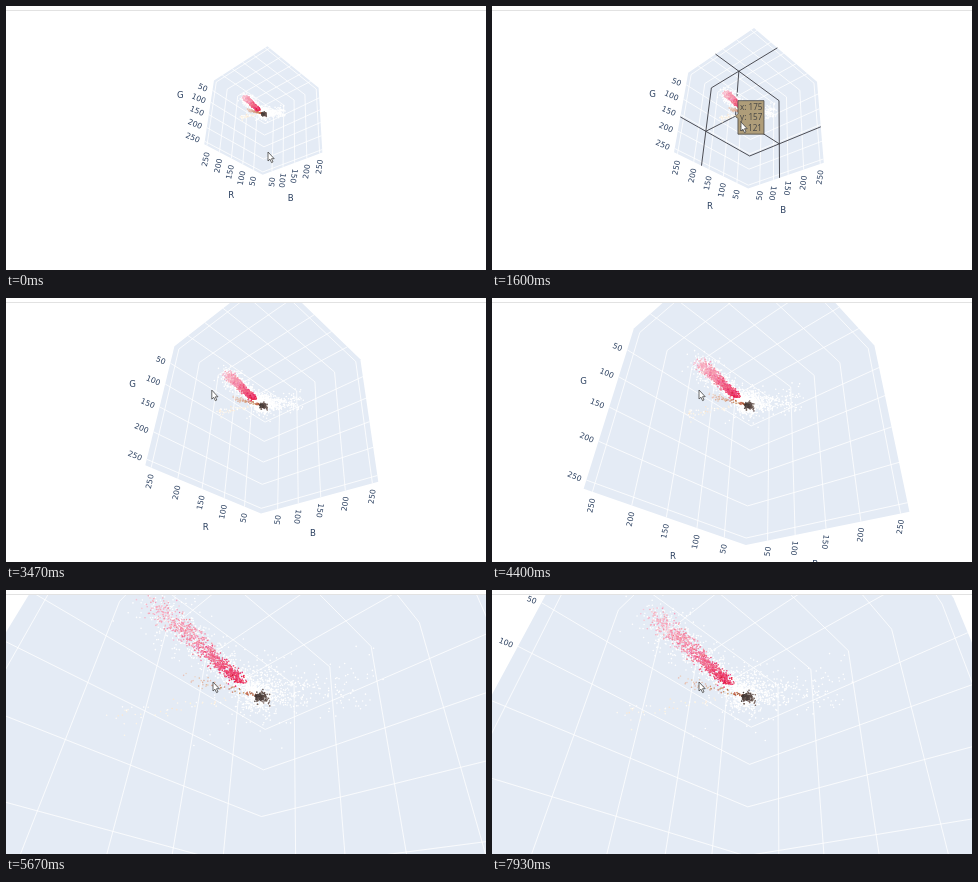
These frames come from a looping animation (480 px wide and 264 px high, 8000 ms). An HTML page with a canvas:

```html
<!DOCTYPE html>
<html lang="en">
<head>
<meta charset="utf-8">
<title>Colour cube</title>
<style>
  html, body { margin: 0; width: 480px; height: 264px; overflow: hidden; background: #fff; }
  canvas { position: absolute; left: 0; top: 0; }
  svg { position: absolute; left: 0; top: 5px; }
  text { font-family: "DejaVu Sans", Verdana, sans-serif; font-size: 7.7px; fill: #2a3f5f; }
  .title { font-size: 8.6px; text-anchor: middle; }
  #tip text { font-family: "Open Sans", sans-serif; font-size: 8.1px; fill: #444; }
</style>
</head>
<body>
<canvas id="plot" width="480" height="264"></canvas>
<svg width="480" height="259" viewBox="0 5 480 259">
  <g id="labels"></g>
  <g id="tip">
    <path d="M0 0l2.5 -2.5V-15.5H28.5V18H2.5V2.5Z" fill="rgb(175,157,121)" stroke="#444" stroke-width=".8"/>
    <text x="4.6" y="-6.4">x: 175</text>
    <text x="4.6" y="4.1">y: 157</text>
    <text x="4.6" y="14.6">z: 121</text>
  </g>
  <path id="cursor" d="M0 0V9L2 7.2L3.5 10.6L5 9.9L3.5 6.7H6.2Z" fill="#fff" stroke="#444" stroke-width=".8" stroke-linejoin="round"/>
</svg>
<script>
const LOOP = 8000, STEP = 200 / 3;
const CX = 258.9, CY = 108.3, FOCAL = 373, TILT = 0.577;
// Screen direction of each cube edge
const AXES = [[-0.7, -0.46], [-0.038, 0.82], [0.722, -0.36]];
const TICKS = [50, 100, 150, 200, 250];
const unit = v => (v - 6.3) / 254;
const HOVER = [175, 157, 121].map(unit);

// Each move: begin, end, value reached
const ZOOM = [[70, 870, 5.55], [1200, 2330, 2.565], [3930, 4830, 1.66], [5200, 6000, 0.745], [7200, 7930, 1.055]];
const POINTER = [[70, 600, [249, 116]], [2660, 2930, [135, 99]], [3270, 3470, [207, 92]]];

const lerp = (a, b, k) => a + (b - a) * k;
const progress = (t, begin, end) => Math.min(1, Math.max(0, (t - begin) / (end - begin)));
const easeOut = k => 1 - (1 - k) ** 1.5;

// Scrolling multiplies the distance, so it eases in log space
const distanceAt = t => Math.exp(ZOOM.reduce(
  (d, [begin, end, to]) => lerp(d, Math.log(to), easeOut(progress(t, begin, end))), Math.log(4.78)));
const pointerAt = t => POINTER.reduce(
  (p, [begin, end, to]) => p.map((v, i) => lerp(v, to[i], progress(t, begin, end))), [262, 146]);

let seed = 7;
function rand() {
  seed = (seed + 0x6d2b79f5) | 0;
  let x = Math.imul(seed ^ (seed >>> 15), 1 | seed);
  x = (x + Math.imul(x ^ (x >>> 7), 61 | x)) ^ x;
  return ((x ^ (x >>> 14)) >>> 0) / 4294967296;
}
const gauss = () => (rand() + rand() + rand() + rand() - 2) * 1.73;

// Points fan out from the dark core towards a tip; each is [u, v, depth]
const CORE = [-0.03, -0.01, -0.7];
const points = [];
function fan(count, tip, spread, first, tint) {
  for (let i = 0; i < count; i++) {
    const k = lerp(first, 1, rand());
    const s = spread * (0.5 + 0.6 * k);
    const [u, v, z] = CORE.map((c, j) => lerp(c, tip[j], k) + gauss() * (j < 2 ? s : 0.04));
    points.push({ u, v, z, fill: tint(k) });
  }
}
const white = () => "#fff";
const shade = (hue, sat, dark, light) => k =>
  `hsl(${hue + gauss() * 5} ${sat}% ${lerp(dark, light, k) + gauss() * 4}%)`;

const PINK_TIP = [-0.25, -0.21, 0.1];
fan(750, [0, -0.02, 0.3], 0.038, 0, white);
fan(800, PINK_TIP, 0.03, 0.1, white);
fan(230, [0.22, -0.03, 0.15], 0.034, 0, white);
fan(45, [-0.305, 0.042, 0.22], 0.012, 0.4, shade(36, 80, 92, 97));
fan(60, [-0.225, -0.06, -0.15], 0.009, 0, shade(20, 50, 42, 84));
fan(800, PINK_TIP, 0.0145, 0.28, shade(345, 82, 42, 86));
fan(170, [0, 0, -0.6], 0.013, 0, shade(15, 12, 22, 42));

const ctx = document.getElementById("plot").getContext("2d");
const tip = document.getElementById("tip");
const cursor = document.getElementById("cursor");
const labels = document.getElementById("labels");

function addText(value, cls) {
  const el = document.createElementNS("http://www.w3.org/2000/svg", "text");
  el.textContent = value;
  el.setAttribute("class", cls);
  labels.append(el);
  return el;
}

// Edge that carries each scale, its text angle and offsets
const SCALES = [
  { name: "R", base: [0, 1, 0], axis: 0, angle: -78, gap: [0, 6.5], shift: [-4, 37.5] },
  { name: "G", base: [1, 0, 0], axis: 1, angle: 23, gap: [-5, -1], shift: [-29, -12.5] },
  { name: "B", base: [0, 1, 0], axis: 2, angle: -82, gap: [0.5, 6], shift: [0, 36.5] }
];
for (const s of SCALES) {
  s.ticks = TICKS.map(v => ({ v, el: addText(v, "tick") }));
  s.title = addText(s.name, "title");
}

let dist;
function project(p) {
  const k = FOCAL / (dist - TILT * (p[0] + p[1] + p[2] - 1.5));
  return [CX, CY].map((c, j) => c + k * p.reduce((sum, v, i) => sum + (v - 0.5) * AXES[i][j], 0));
}
const withAxis = (p, i, v) => p.map((c, j) => j === i ? v : c);

function trace(...corners) {
  corners.forEach((c, i) => ctx[i ? "lineTo" : "moveTo"](...project(c)));
}

function drawFaces() {
  ctx.fillStyle = "#e4ebf5";
  ctx.beginPath();
  trace([0, 1, 0], [1, 1, 0], [1, 0, 0], [1, 0, 1], [0, 0, 1], [0, 1, 1]);
  ctx.fill();
  ctx.strokeStyle = "rgba(255,255,255,.8)";
  ctx.lineWidth = 1;
  ctx.beginPath();
  for (let a = 0; a < 3; a++) for (let b = 0; b < 3; b++) {
    if (a === b) continue;
    for (const v of TICKS) {
      const p = withAxis([0, 0, 0], a, unit(v));
      trace(p, withAxis(p, b, 1));
    }
  }
  ctx.stroke();
}

function drawSpikes() {
  ctx.strokeStyle = "#3c3c42";
  ctx.lineWidth = 0.9;
  ctx.beginPath();
  for (let a = 0; a < 3; a++) {
    const foot = withAxis(HOVER, a, 0);
    trace(HOVER, foot);
    for (let b = 0; b < 3; b++) {
      if (a !== b) trace(withAxis(foot, b, 0), withAxis(foot, b, 1));
    }
  }
  ctx.stroke();
}

function drawPoints() {
  for (const p of points) {
    const depth = dist - p.z;
    if (depth < 0.05) continue;
    const k = FOCAL / depth;
    ctx.fillStyle = p.fill;
    ctx.beginPath();
    ctx.arc(CX + p.u * k, CY + p.v * k, 0.8, 0, 7);
    ctx.fill();
  }
}

function placeLabels() {
  for (const s of SCALES) {
    for (const { v, el } of s.ticks) {
      const [x, y] = project(withAxis(s.base, s.axis, unit(v)));
      const flip = s.name === "B" && (v === 100 || v === 150);
      el.setAttribute("text-anchor", flip ? "start" : "end");
      el.setAttribute("dy", 2.8);
      el.setAttribute("transform",
        `translate(${x + s.gap[0]} ${y + s.gap[1]}) rotate(${flip ? s.angle + 180 : s.angle})`);
    }
    const [x, y] = project(withAxis(s.base, s.axis, 0.5));
    s.title.setAttribute("x", x + s.shift[0]);
    s.title.setAttribute("y", y + s.shift[1]);
  }
}

function render(t) {
  dist = distanceAt(t);
  const hovering = t >= 790 && t < 2660;

  ctx.clearRect(0, 0, 480, 264);
  ctx.fillStyle = "#e2e2e2";
  ctx.fillRect(0, 4, 480, 1);
  ctx.save();
  ctx.beginPath();
  ctx.rect(0, 5, 480, 259);
  ctx.clip();
  drawFaces();
  if (hovering) drawSpikes();
  drawPoints();
  ctx.restore();

  placeLabels();
  tip.setAttribute("visibility", hovering ? "visible" : "hidden");
  tip.setAttribute("transform", `translate(${project(HOVER)})`);
  cursor.setAttribute("transform", `translate(${pointerAt(t)})`);
}

const start = performance.now();
let shown = -1;
function tick() {
  const t = Math.max(0, performance.now() - start) % LOOP;
  const step = Math.floor((t + 5) / STEP) % Math.round(LOOP / STEP);
  if (step !== shown) render(step * STEP);
  shown = step;
  requestAnimationFrame(tick);
}
tick();
</script>
</body>
</html>
```
